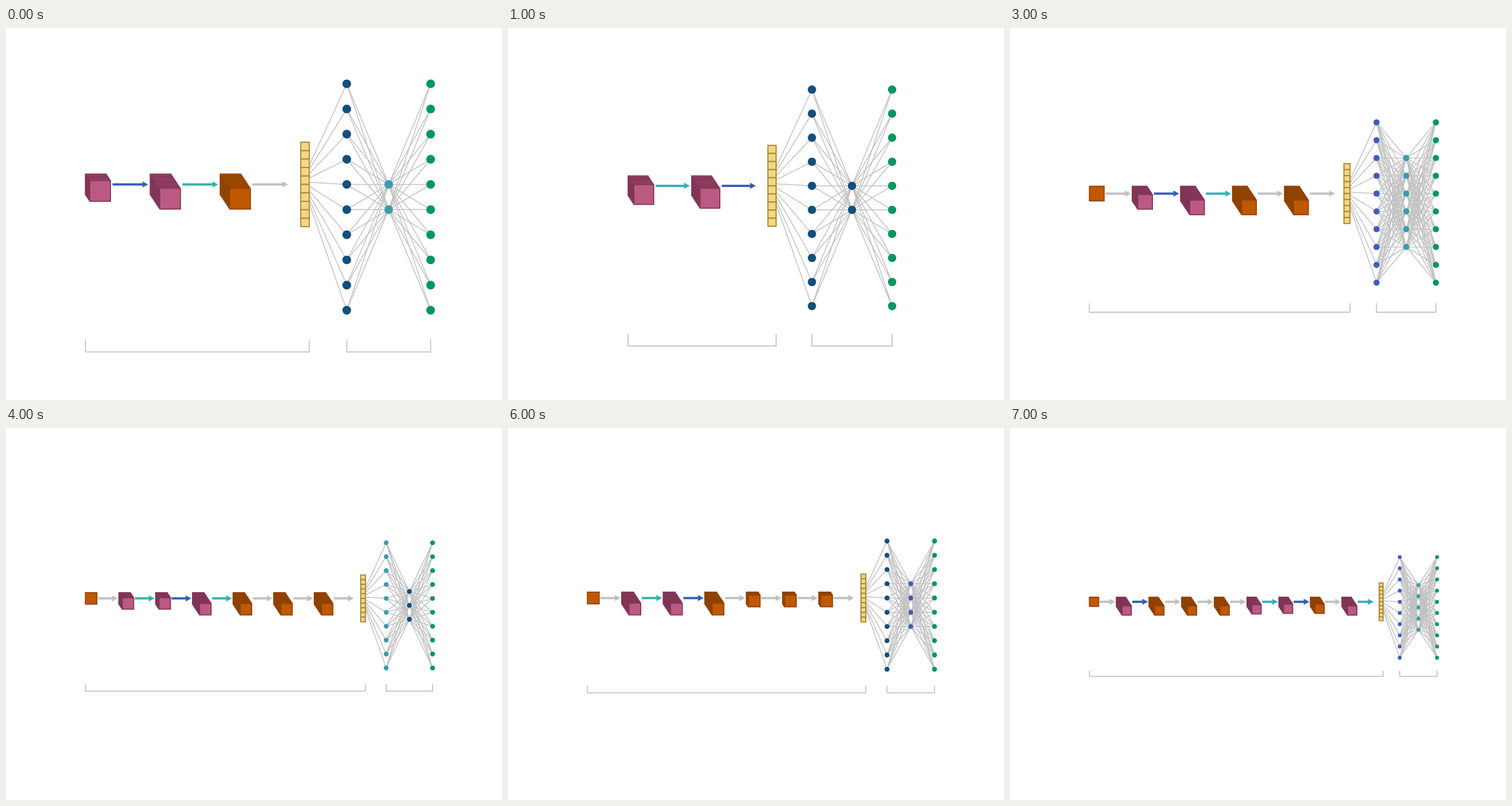
Write an HTML page that moves like this. It is 864 px wide and 648 px high and loops after 8 s.

```html
<!DOCTYPE html>
<html lang="en">
<head>
<meta charset="utf-8">
<title>Network architectures</title>
<style>
  html, body { margin: 0; width: 100%; height: 100%; overflow: hidden; background: #fff; }
  svg { display: block; width: 100vw; height: 100vh; }
</style>
</head>
<body>
<svg id="stage" viewBox="0 0 864 648"></svg>
<script>
const HOLD = 1000;
const CENTER = { x: 442.8, y: 327 };
const FIT_WIDTH = 608.9;

// Lengths in units of the spacing between neurons.
const BOX = 0.825, DX = 0.0342, DY = 0.0517, GAP = 1.58, PAD = 0.08;
const CELL = 0.336, CELLS = 10, FLAT_GAP = 2, FLAT_W = 0.34;
const DENSE_GAP = 1.49, COL_GAP = 5 / 3, DOT = 0.173;
const BRACKET = 6.66, TICK = 0.5;

const GREY = '#c1c1c1';
const PINK = ['#ba5a83', '#803555'];
const ORANGE = ['#c05800', '#8f4200'];
const GOLD = ['#f3d784', '#a9893a'];
const ARROW = { g: GREY, b: '#3560b8', t: '#33b2b3' };
const NEURON = { navy: '#134f7c', blue: '#3f5dbb', teal: '#3b9cad', green: '#00985a' };

// flow: one letter per stack, the colour of the arrow that leaves it (g = unchanged stack).
const nets = [
  { flow: 'btg', depth: [5, 11, 11], dense: [[10, 'navy'], [2, 'teal']] },
  { flow: 'tb', depth: [7, 10], dense: [[10, 'navy'], [2, 'navy']], unit: 41.9 },
  { flow: 'gtggggbgg', depth: [0, 15, 15, 15, 15, 15, 3, 3, 3], dense: [[10, 'blue'], [11, 'blue']] },
  { flow: 'gbtgg', depth: [0, 9, 15, 15, 15], dense: [[10, 'blue'], [6, 'teal']] },
  { flow: 'gtbtggg', depth: [0, 7, 7, 15, 15, 15, 15], dense: [[10, 'teal'], [3, 'navy']] },
  { flow: 'btggg', depth: [10, 7, 7, 7, 7], dense: [[10, 'teal'], [8, 'blue']] },
  { flow: 'gtbgggg', depth: [0, 15, 15, 15, 4, 4, 4], dense: [[10, 'navy'], [4, 'blue']] },
  { flow: 'gbgggtbgt', depth: [0, 15, 15, 15, 15, 13, 12, 12, 15], dense: [[10, 'blue'], [5, 'teal']] }
];

const range = n => Array.from({ length: n }, (_, i) => i);
const num = v => +v.toFixed(2);

function rect(x, y, w, h, [fill, stroke], weight) {
  return `<rect x="${num(x)}" y="${num(y)}" width="${num(w)}" height="${num(h)}" fill="${fill}" stroke="${stroke}" stroke-width="${weight}"/>`;
}

function path(points, weight) {
  const d = points.map(p => p.map(num).join(' ')).join('L');
  return `<path d="M${d}" fill="none" stroke="${GREY}" stroke-width="${weight}"/>`;
}

function dot([x, y], r, fill) {
  return `<circle cx="${num(x)}" cy="${num(y)}" r="${num(r)}" fill="${fill}"/>`;
}

function arrow(x1, x2, y, color) {
  const neck = x2 - 10;
  const pts = [[x1, -2], [neck, -2], [neck, -5.3], [x2, 0], [neck, 5.3], [neck, 2], [x1, 2]];
  return `<polygon fill="${color}" points="${pts.map(([x, dy]) => num(x) + ',' + num(y + dy)).join(' ')}"/>`;
}

function stack(x, y, size, depth, u, colors) {
  return range(depth + 1)
    .map(i => rect(x + i * DX * u, y + i * DY * u, size, size, colors, 1.8))
    .join('');
}

function bracket(x1, x2, y, tick) {
  return path([[x1, y - tick], [x1, y], [x2, y], [x2, y - tick]], 1.7);
}

function drawNet({ flow, depth, dense, unit }) {
  const columns = [...dense, [10, 'green']];
  const layers = depth.reduce((a, b) => a + b, 0);
  const span = depth.length * BOX + layers * DX + (depth.length - 1) * GAP
    + FLAT_GAP + FLAT_W + DENSE_GAP + (columns.length - 1) * COL_GAP + DOT;
  const u = unit || FIT_WIDTH / span;
  const tallest = Math.max(...columns.map(c => c[0]));
  const axis = CENTER.y - (BRACKET - (tallest / 2 - 1 + DOT)) / 2 * u;
  const left = CENTER.x - span * u / 2;
  const size = BOX * u;
  let x = left, out = '';

  depth.forEach((d, i) => {
    const end = x + size + d * DX * u;
    out += stack(x, axis - size / 2, size, d, u, flow[i] === 'g' ? ORANGE : PINK);
    out += arrow(end + PAD * u, end + (GAP - PAD) * u, axis, ARROW[flow[i]]);
    x = end + (i < depth.length - 1 ? GAP : FLAT_GAP) * u;
  });

  const flatX = x, flatEnd = x + FLAT_W * u;
  const points = columns.map(([n], k) => range(n).map(i =>
    [flatEnd + (DENSE_GAP + k * COL_GAP) * u, axis + (i - n / 2 + 1) * u]));

  points[0].forEach((p, i) => {
    out += path([[flatEnd, axis + (i - 4.5) * CELL / 2 * u], p], 1.5);
  });
  points.slice(1).forEach((col, k) => {
    for (const a of points[k]) for (const b of col) out += path([a, b], 1.5);
  });
  for (const i of range(CELLS)) {
    out += rect(flatX, axis + (i - CELLS / 2) * CELL * u, FLAT_W * u, CELL * u, GOLD, 2);
  }
  points.forEach((col, k) => {
    for (const p of col) out += dot(p, DOT * u, NEURON[columns[k][1]]);
  });

  const base = axis + BRACKET * u;
  out += bracket(left, flatEnd, base, TICK * u);
  out += bracket(points[0][0][0], points[points.length - 1][0][0], base, TICK * u);
  return out;
}

const stage = document.getElementById('stage');
const start = performance.now();
let shown = -1;

function update(now) {
  const index = Math.floor(Math.max(0, now - start) / HOLD) % nets.length;
  if (index !== shown) {
    stage.innerHTML = drawNet(nets[index]);
    shown = index;
  }
  requestAnimationFrame(update);
}
update(start);
</script>
</body>
</html>
```
